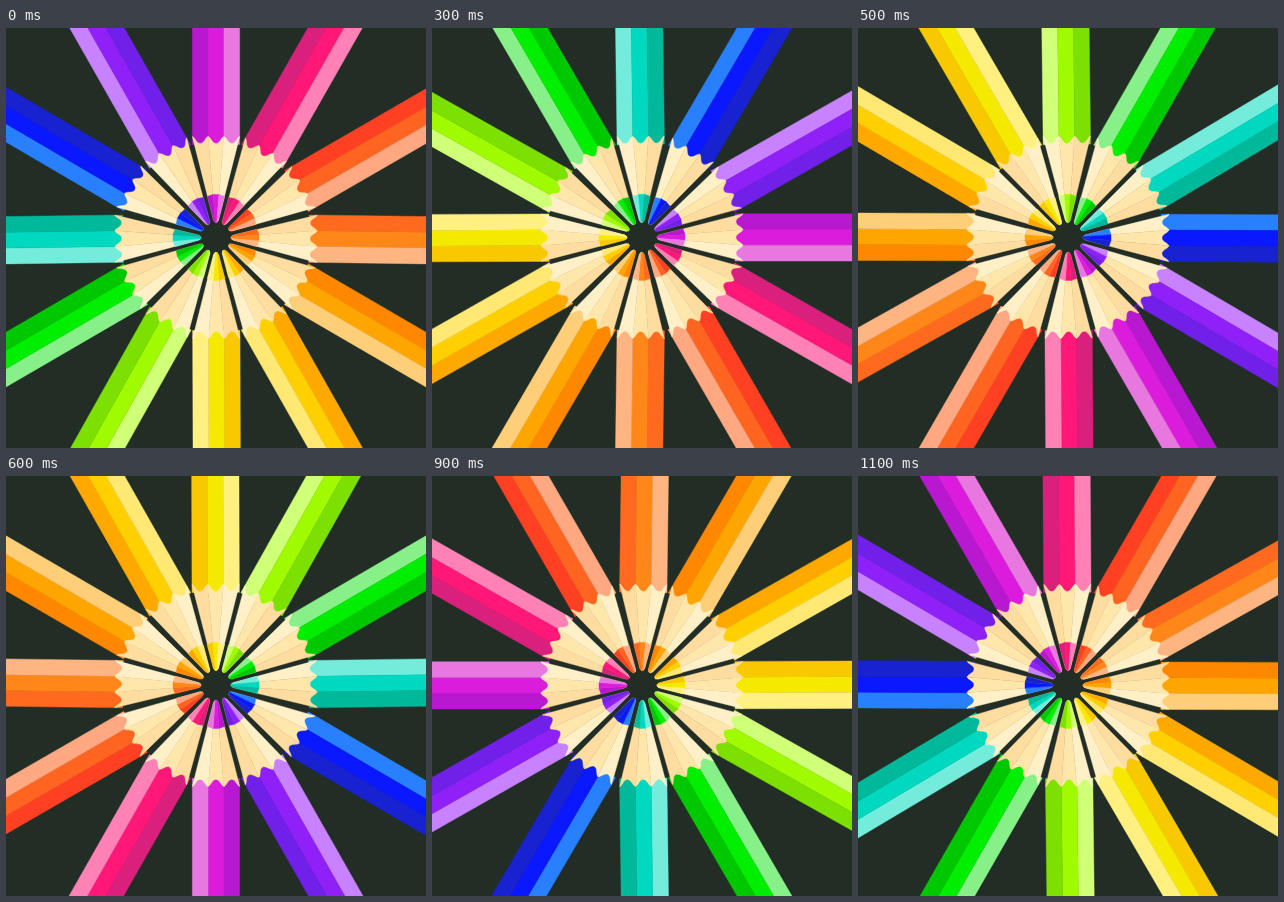
These frames come from a looping animation (420x420 px, 1.2 s). An HTML page:

```html
<!DOCTYPE html>
<html>
<head>
<meta charset="utf-8">
<style>
  html, body { margin: 0; width: 100%; height: 100%; overflow: hidden; background: #222d26; }
  svg { display: block; width: 100%; height: 100%; }
</style>
</head>
<body>
<svg viewBox="0 0 420 420"><g id="wheel"></g></svg>
<script>
const wheel = document.getElementById('wheel');
const WOOD = ['#ffdca0', '#ffe6aa', '#fff0c8'];

// Facet colours from left to right and sideways lean, clockwise from the top
const pencils = [
  ['#b818d0', '#dc1cdc', '#e878e0', 0],
  ['#d8207c', '#ff1878', '#ff82b6', -1],
  ['#ff4022', '#ff6420', '#ffa882', 0],
  ['#ff6a1f', '#ff8618', '#ffb582', 2],
  ['#ff8800', '#ffa500', '#ffce78', 0.5],
  ['#ffa800', '#ffd000', '#ffe873', 1.2],
  ['#f8c800', '#f6e900', '#fff080', -0.5],
  ['#d0ff78', '#a0fa00', '#7ce000', -1.8],
  ['#88f088', '#00ee00', '#00c800', -0.5],
  ['#74ecdc', '#00d8c0', '#00b89a', -2],
  ['#2880ff', '#0a18ff', '#1822d0', 0.8],
  ['#c882ff', '#9020f8', '#7020e8', 1]
];

const shape = (d, color) =>
  `<path d="${d}" fill="${color}" stroke="${color}" stroke-width=".4"/>`;

// Each part takes the left and right border of one facet
const depth = (x, outer, inner) => Math.abs(x) > 20 ? outer : inner;
const tip = (a, b) => `L${b * .1} ${-depth(b, 17, 15)}L${a * .1} ${-depth(a, 17, 15)}Z`;
const body = (a, b) => `M${a} -93V-330H${b}V-93Z`;
const wood = (a, b) =>
  `M${a} -101C${a + 3} -100 ${a + 4} -94 ${a + 8} -94S${b - 3} -100 ${b} -101` + tip(a, b);
const lead = (a, b) =>
  `M${a * .37} ${-depth(a, 41, 43)}L${b * .37} ${-depth(b, 41, 43)}` + tip(a, b);

const layer = (part, colors) => colors.map((color, k) => {
  const a = -23.7 + 15.8 * k;
  return shape(part(a, a + 15.8), color);
}).join('');

wheel.innerHTML = pencils.map((p, i) => {
  const paint = p.slice(0, 3);
  const woods = i < 7 ? WOOD : [...WOOD].reverse();
  const lean = p[3] / 150 * 180 / Math.PI;
  return `<g transform="rotate(${30 * i + lean})">`
    + layer(body, paint) + layer(wood, woods) + layer(lead, paint) + '</g>';
}).join('');

const start = performance.now();
function draw() {
  const step = Math.floor((performance.now() - start) / 100) % 12;
  wheel.setAttribute('transform', `translate(210 209.4) rotate(${step * 30})`);
  requestAnimationFrame(draw);
}
draw();
</script>
</body>
</html>
```
